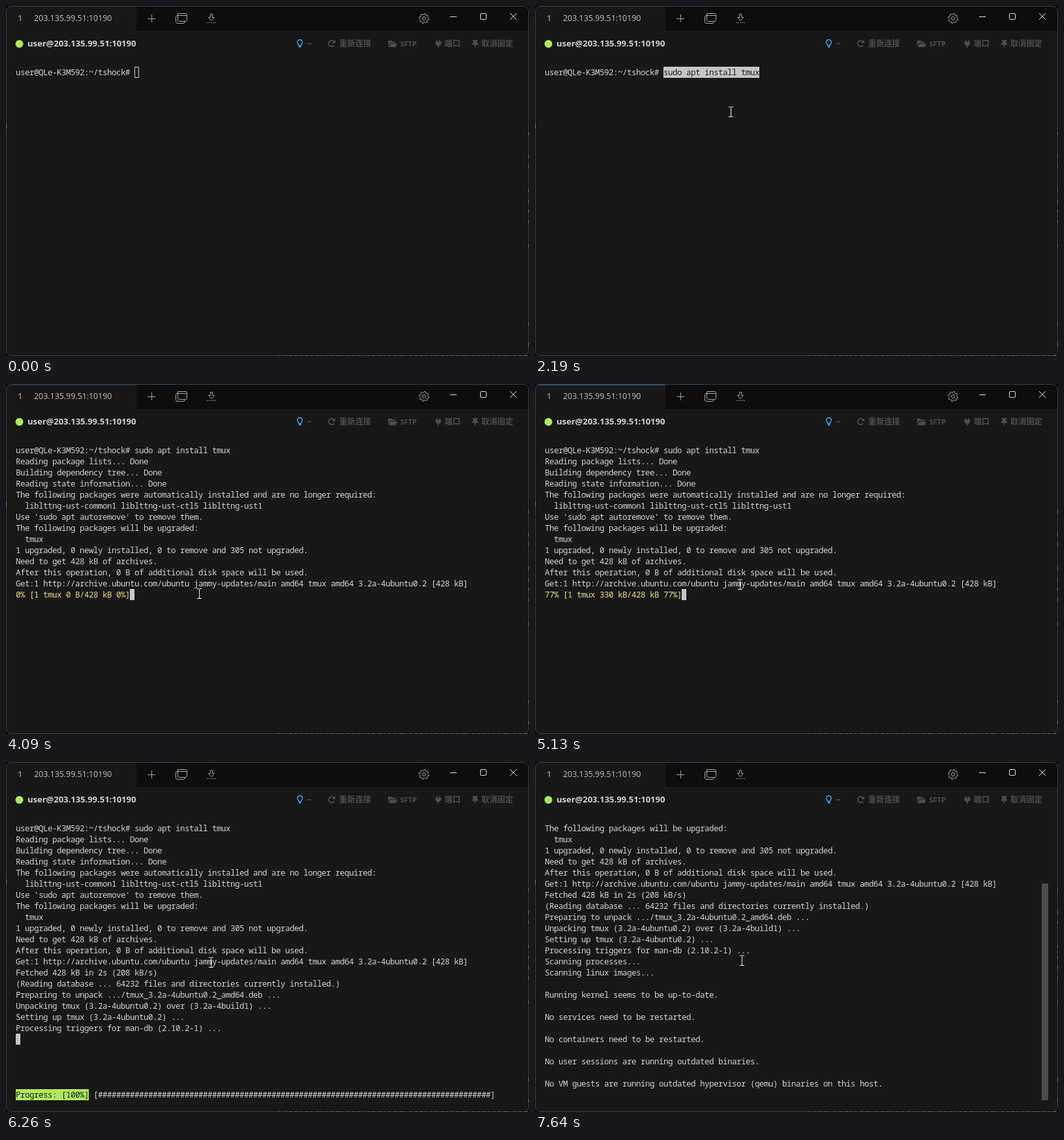
Write an HTML page with a canvas that moves like this. It is 802 by 536 pixels and loops after 8000 ms.

```html
<!DOCTYPE html>
<html lang="zh">
<head>
<meta charset="utf-8">
<style>
html, body { margin: 0; width: 100%; height: 100%; overflow: hidden; background: #0b0b0b; }
canvas { display: block; }
</style>
</head>
<body>
<canvas id="stage" width="802" height="536"></canvas>
<script>
const c = document.getElementById('stage').getContext('2d');
const LOOP = 8000, CELL = 7, LINE = 17, LEFT = 15, TOP = 93;
const BG = '#181818', FG = '#d2d2d2', BLOCK = '#c6c6c6', LIME = '#afe862', DIM = '#4d4d4d';
const MONO = '12.5px "Noto Sans Mono", "DejaVu Sans Mono", monospace';
const SANS = '"Open Sans", "Noto Sans", sans-serif';
const CJK = '"Noto Sans CJK SC", "Noto Sans CJK", sans-serif';

const prompt = 'user@QLe-K3M592:~/tshock# ', command = 'sudo apt install tmux';
const lists = 'Reading package lists... ', tree = 'Building dependency tree... ';
const state = 'Reading state information... ', db = '(Reading database ... ';

// [time, row, text]: writes lines from that row on; the cursor stays at the end
const output = [
  [0, 0, prompt],
  [1000, 0, prompt + command],
  [2390, 0, prompt + command + '\n'],
  [2430, 1, lists + '0%'],
  [2470, 1, lists + 'Done\n' + tree + '0%'],
  [2510, 2, tree + '50%'],
  [2760, 2, tree + 'Done\n' + state + '0%'],
  [2800, 3, state + 'Done\n'],
  [3130, 4, `The following packages were automatically installed and are no longer required:
  liblttng-ust-common1 liblttng-ust-ctl5 liblttng-ust1
Use 'sudo apt autoremove' to remove them.
`],
  [3250, 7, `The following packages will be upgraded:
  tmux
1 upgraded, 0 newly installed, 0 to remove and 305 not upgraded.
Need to get 428 kB of archives.
After this operation, 0 B of additional disk space will be used.
`],
  [3370, 12, '0% [Working]'],
  [3930, 12, `Get:1 http://archive.ubuntu.com/ubuntu jammy-updates/main amd64 tmux amd64 3.2a-4ubuntu0.2 [428 kB]
0% [1 tmux 0 B/428 kB 0%]`],
  [4210, 13, '28% [1 tmux 118 kB/428 kB 28%]'],
  [5010, 13, '77% [1 tmux 330 kB/428 kB 77%]'],
  [5170, 13, '100% [Working]'],
  [5290, 13, 'Fetched 428 kB in 2s (208 kB/s)\n'],
  [5490, 14, db + '5%'],
  [5570, 14, db + '64232 files and directories currently installed.)\n'],
  [5610, 15, 'Preparing to unpack .../tmux_3.2a-4ubuntu0.2_amd64.deb ...\n'],
  [5690, 16, 'Unpacking tmux (3.2a-4ubuntu0.2) over (3.2a-4build1) ...\n'],
  [5770, 17, `Setting up tmux (3.2a-4ubuntu0.2) ...
Processing triggers for man-db (2.10.2-1) ...
`],
  [6380, 19, ''],
  [6860, 19, `Scanning processes...
Scanning linux images...

Running kernel seems to be up-to-date.

No services need to be restarted.

No containers need to be restarted.

No user sessions are running outdated binaries.

No VM guests are running outdated hypervisor (qemu) binaries on this host.
`]
];
const progress = [[0, -1], [5490, 0], [5570, 20], [5690, 40], [5770, 80], [6260, 100], [6380, -1]];

// Pointer keys: [time, x, y]
const pointer = [[80, 301, 546], [720, 287, 162], [1180, 287, 162], [1280, 300, 162], [3200, 300, 162],
  [3900, 296, 321], [4300, 296, 321], [4720, 314, 307], [7460, 314, 307], [7640, 317, 304]];

const latest = (list, t) => list.filter(e => e[0] <= t).pop();

function rect(color, x, y, w, h) {
  c.fillStyle = color;
  c.fillRect(x, y, w, h);
}
function label(text, x, y, font, color) {
  c.font = font;
  c.fillStyle = color;
  c.fillText(text, x, y);
}
function stroke(path, color, width = 1) {
  c.strokeStyle = color;
  c.lineWidth = width;
  c.stroke(new Path2D(path));
}
function fill(path, color) {
  c.fillStyle = color;
  c.fill(new Path2D(path));
}
function cells(text, row, color, col = 0) {
  c.font = MONO;
  c.fillStyle = color;
  [...text].forEach((ch, i) => c.fillText(ch, LEFT + (col + i) * CELL, TOP + row * LINE + 13));
}
function block(row, col, n, color) {
  rect(color, LEFT + col * CELL, TOP + row * LINE, n * CELL, LINE);
}

function gear(x, y) {
  let d = '';
  for (let i = 0; i < 32; i++) {
    const a = (i + .5) * Math.PI / 16, r = i % 4 < 2 ? 7.6 : 5.8;
    d += (i ? 'L' : 'M') + (x + r * Math.cos(a)) + ' ' + (y + r * Math.sin(a));
  }
  stroke(d + 'Z', '#a8a8a8');
  stroke(`M${x + 2.5} ${y}a2.5 2.5 0 1 1-5 0a2.5 2.5 0 1 1 5 0`, '#a8a8a8');
}

function chrome(t) {
  rect('#0b0b0b', 0, 0, 802, 536);
  c.beginPath();
  c.roundRect(.5, .5, 801, 535, 8);
  c.fillStyle = BG;
  c.fill();
  c.save();
  c.clip();
  rect('#0d0d0d', 200, 0, 602, 38);
  c.restore();
  c.strokeStyle = '#3b3d40';
  c.lineWidth = 1;
  c.stroke();

  // Tab activity line
  const glow = t >= 5010 && t < 5970 ? .8 : t >= 2760 && t < 4730 ? .3 : 0;
  c.globalAlpha = glow;
  rect('#3a78b8', 3, 1, 196, 1);
  c.globalAlpha = 1;

  label('1', 18, 23, 'bold 12px ' + SANS, '#777');
  label('203.135.99.51:10190', 43, 23, '12.4px ' + SANS, '#c0c0c0');
  stroke('M217 19.5H229M223.5 13V25', '#a0a0a0');
  stroke('M263.5 11.5H275.5Q277.5 11.5 277.5 13.5V21.5Q277.5 23.5 275.5 23.5H265.5Q263.5 23.5 263.5 21.5ZM263.5 14.5H277.5M263 14.5Q260.5 14.5 260.5 17V24Q260.5 26.5 263 26.5H272Q274.5 26.5 274.5 24', '#a8a8a8');
  stroke('M313.5 12.5H316.5V17.5H319.5L315 22.5L310.5 17.5H313.5Z', '#a0a0a0');
  for (let x = 308; x < 322; x += 3) rect('#a0a0a0', x, 25, 1.5, 1);
  gear(641, 19);
  stroke('M681 16.5H691', '#e0e0e0');
  stroke('M729 11.5H735Q736.5 11.5 736.5 13V19Q736.5 20.5 735 20.5H729Q727.5 20.5 727.5 19V13Q727.5 11.5 729 11.5Z', '#e0e0e0');
  stroke('M773 11L783 21M783 11L773 21', '#e0e0e0');

  fill('M26.5 58a6 6 0 1 1-12 0a6 6 0 1 1 12 0', LIME);
  label('user@203.135.99.51:10190', 33, 62, 'bold 13px ' + SANS, '#d2d2d2');

  stroke('M449 60.5C449 58.5 446.8 58 446.8 55.5A3.8 3.8 0 0 1 454.4 55.5C454.4 58 452.2 58.5 452.2 60.5Z', '#4ba3f5', 1.4);
  stroke('M449 62.5H452.4', '#4ba3f5', 2);
  rect(DIM, 462, 57, 6, 1.5);
  stroke('M503.2 60A4.5 4.5 0 1 1 502.6 54.6', DIM, 1.8);
  fill('M505 52V57H500Z', DIM);
  const cjk = 'bold 12.2px ' + CJK;
  label('重新连接', 511, 62, cjk, DIM);
  fill('M586 61V53H591L592.5 54.5H597V56.5H589L586.5 61ZM589.8 57.5H600L597.3 63H586.5Z', DIM);
  label('SFTP', 604.5, 62, 'bold 11px ' + SANS, DIM);
  fill('M660 52H661.6V55H664V52H665.6V55H667.5V57H667Q667 60.5 663.6 61V64H662V61Q658.6 60.5 658.6 57H658V55H660Z', DIM);
  label('端口', 672.5, 62, cjk, DIM);
  fill('M715.5 52H723.5V53.6H722.2L722.6 56.5Q724.5 57.5 724.5 59.5H720.2V63.5H718.8V59.5H714.5Q714.5 57.5 716.4 56.5L716.8 53.6H715.5Z', DIM);
  label('取消固定', 729, 62, cjk, DIM);

  // Slivers of the desktop around the window
  rect('#3f9a58', 0, 180, 1, 8);
  rect('#35506c', 222, 0, 40, 1);
  for (const y of [193, 228, 243, 280, 297, 312, 328, 365, 484, 516]) rect('#777', 801, y, 1, 5);
  for (let i = 0; i < 48; i++) rect('#666', 418 + i * 8 + i * i % 3, 535, 2 + i * 5 % 4, 1);
}

function terminal(t) {
  const rows = [];
  let row = 0, col = 0, last = 0;
  for (const [time, start, text] of output) {
    if (time > t) break;
    const lines = text.split('\n');
    lines.forEach((s, i) => rows[start + i] = s);
    row = start + lines.length - 1;
    col = lines.at(-1).length;
    last = time;
  }
  const scroll = t >= 6860 ? 7 : 0, scanning = t >= 6580 && !scroll;
  if (scanning) {
    const n = Math.min(84, Math.floor((t - 6580) / 40) * 13 + 2);
    rows[19] = 'Scanning processes... [' + '='.repeat(n).padEnd(84) + ']';
  }

  const pasted = t >= 1000 && t < 2390;
  if (pasted) block(0, prompt.length, command.length, BLOCK);
  rows.slice(scroll).forEach((s, y) => {
    if (pasted && y === 0) {
      cells(prompt, 0, FG);
      cells(command, 0, '#1c1c1c', prompt.length);
    } else cells(s, y, /^\d+% \[/.test(s) ? '#e8dc8c' : FG);
  });

  if (t < 760) {
    c.strokeStyle = BLOCK;
    c.lineWidth = 1;
    c.strokeRect(LEFT + col * CELL + .5, TOP + .5, CELL - 1, LINE - 1);
  } else if (!scanning && Math.floor((t - last) / 605) % 2 === 0) block(row - scroll, col, 1, BLOCK);

  const pct = latest(progress, t)[1];
  if (pct >= 0) {
    const done = Math.floor(86 * pct / 100);
    block(24, 0, 16, LIME);
    cells(`Progress: [${String(pct).padStart(3)}%]`, 24, '#1c1c1c');
    cells('[' + '#'.repeat(done).padEnd(86, '.') + ']', 24, FG, 17);
  }
  if (scroll) rect('#4c4c4c', 777, 186, 10, 332);
}

function mouse(t) {
  if (t < pointer[0][0]) return;
  const a = latest(pointer, t), b = pointer[pointer.indexOf(a) + 1] || a;
  const u = a === b ? 0 : (t - a[0]) / (b[0] - a[0]), e = u * u * (3 - 2 * u);
  const x = Math.round(a[1] + (b[1] - a[1]) * e), y = Math.round(a[2] + (b[2] - a[2]) * e);
  const w = '#f0f0f0';
  rect(w, x, y - 7, 1, 15);
  for (const dy of [-8, 7]) {
    rect(w, x - 3, y + dy, 3, 1);
    rect(w, x + 1, y + dy, 3, 1);
  }
}

function frame(now) {
  const t = now % LOOP;
  chrome(t);
  terminal(t);
  mouse(t);
  requestAnimationFrame(frame);
}
requestAnimationFrame(frame);
</script>
</body>
</html>
```
